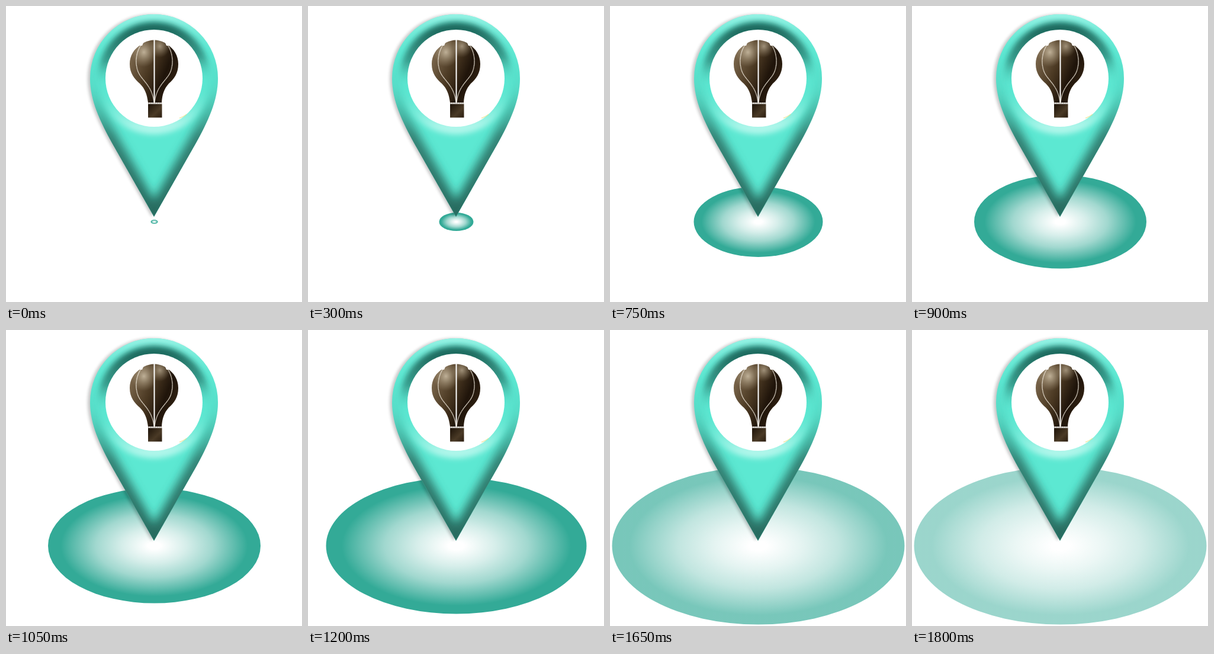
These frames come from a looping animation (500 by 500 pixels, 1950 ms). An HTML page:

```html
<!DOCTYPE html>
<html lang="en">
<head>
<meta charset="utf-8">
<title>Balloon map pin</title>
<style>
  html, body { margin: 0; width: 100%; height: 100%; overflow: hidden; background: #fff; }
  svg { display: block; width: 100%; height: 100%; }
</style>
</head>
<body>
<svg viewBox="0 0 500 500">
  <defs>
    <path id="drop" d="M250 356L180 233C159 195 142 160 142 122A108 108 0 0 1 358 122C358 160 341 195 320 233Z"/>
    <path id="globe" d="M229 65C216 72 209 84 209 98C209 114 217 123 226 131C235 140 238 149 240 163H263C264 149 267 140 275 131C284 123 291 114 291 98C291 84 284 72 272 65L268 62Q250 53 233 62Z"/>
    <clipPath id="inPin"><use href="#drop"/></clipPath>
    <clipPath id="inGlobe"><use href="#globe"/></clipPath>

    <radialGradient id="wave">
      <stop offset=".06" stop-color="#33aa97" stop-opacity="0"/>
      <stop offset=".3" stop-color="#33aa97" stop-opacity=".2"/>
      <stop offset=".55" stop-color="#33aa97" stop-opacity=".46"/>
      <stop offset=".75" stop-color="#33aa97" stop-opacity=".78"/>
      <stop offset=".88" stop-color="#33aa97"/>
    </radialGradient>
    <linearGradient id="rim" gradientUnits="userSpaceOnUse" x1="0" y1="14" x2="0" y2="356">
      <stop offset="0" stop-color="#a4f6ea" stop-opacity=".9"/>
      <stop offset=".2" stop-color="#5ce8d2" stop-opacity=".3"/>
      <stop offset=".36" stop-color="#3fae9d" stop-opacity=".2"/>
      <stop offset=".6" stop-color="#2a6e62" stop-opacity=".85"/>
      <stop offset="1" stop-color="#276a5e"/>
    </linearGradient>
    <linearGradient id="lip" gradientUnits="userSpaceOnUse" x1="245" y1="40" x2="252" y2="204">
      <stop offset="0" stop-color="#1f6a5e"/>
      <stop offset=".3" stop-color="#1f6a5e" stop-opacity=".6"/>
      <stop offset=".58" stop-color="#5ce8d2" stop-opacity="0"/>
      <stop offset="1" stop-color="#b4f7ec" stop-opacity=".95"/>
    </linearGradient>
    <linearGradient id="brown" gradientUnits="userSpaceOnUse" x1="212" y1="85" x2="286" y2="115">
      <stop offset="0" stop-color="#78644a"/>
      <stop offset=".45" stop-color="#4a3822"/>
      <stop offset=".8" stop-color="#1f140a"/>
      <stop offset="1" stop-color="#2c1e10"/>
    </linearGradient>
    <radialGradient id="glow">
      <stop offset="0" stop-color="#c9bba2" stop-opacity=".9"/>
      <stop offset="1" stop-color="#a8987c" stop-opacity="0"/>
    </radialGradient>
    <linearGradient id="basket" x1="0" y1="0" x2="1" y2="1">
      <stop offset="0" stop-color="#1c1208"/>
      <stop offset=".6" stop-color="#4a3a26"/>
      <stop offset="1" stop-color="#2b1d10"/>
    </linearGradient>
    <filter id="soft" x="-20%" y="-20%" width="140%" height="140%"><feGaussianBlur stdDeviation="2.5"/></filter>
    <filter id="bevel" x="-20%" y="-20%" width="140%" height="140%"><feGaussianBlur stdDeviation="8"/></filter>
    <filter id="inner" x="-20%" y="-20%" width="140%" height="140%"><feGaussianBlur stdDeviation="5"/></filter>
  </defs>

  <rect width="500" height="500" fill="#fff"/>
  <ellipse id="ripple" cx="250.5" cy="364.5" fill="url(#wave)"/>

  <use href="#drop" x="-4" opacity=".22" filter="url(#soft)"/>
  <use href="#drop" fill="#5ce8d2"/>
  <g clip-path="url(#inPin)" fill="none">
    <use href="#drop" stroke="url(#rim)" stroke-width="28" filter="url(#bevel)"/>
    <circle cx="250" cy="122" r="82" stroke="url(#lip)" stroke-width="26" filter="url(#inner)"/>
  </g>
  <circle cx="250" cy="122" r="82" fill="#fff"/>
  <path d="M293 189.5Q300 187 305 183" fill="none" stroke="#e8dc70" stroke-opacity=".6" stroke-width="1.5"/>

  <g id="balloon">
    <use href="#globe" fill="url(#brown)"/>
    <g clip-path="url(#inGlobe)" fill="url(#glow)">
      <ellipse cx="233" cy="78" rx="22" ry="25"/>
      <ellipse cx="260" cy="68" rx="17" ry="19" opacity=".75"/>
    </g>
    <g fill="none" stroke="#fff" stroke-width="1.4">
      <path d="M250.500 57V164" stroke-width="2"/>
      <g stroke="#f0e9dc" stroke-dasharray="1.6 .6">
        <path d="M230 63C219 77 217 98 224 113C231 127 247 135 250 163"/>
        <path d="M271 63C282 77 284 98 277 113C270 127 254 135 251 163"/>
      </g>
    </g>
    <path d="M226 67L234 57L230 67ZM275 67L267 57L271 67Z" fill="#fff"/>
    <rect x="240" y="165.5" width="23.5" height="23" fill="url(#basket)"/>
    <path d="M240 164H264" stroke="#4a3a26" stroke-width="1.2" stroke-dasharray="1.5 1.5"/>
  </g>
</svg>
<script>
  const STEP = 150, LOOP = 1950;
  const widths = [6, 14.5, 29, 47.5, 75.5, 109, 145.5, 179.5, 220, 247];
  const heights = [3.5, 7.5, 15.5, 26, 41.5, 59.5, 79, 97, 115, 133];
  const ripple = document.getElementById('ripple');

  // The ripple grows in hard steps, then fades at full size.
  function draw(time) {
    const step = Math.floor((time % LOOP) / STEP);
    const last = widths.length - 1;
    const size = Math.min(step, last);
    ripple.setAttribute('rx', widths[size]);
    ripple.setAttribute('ry', heights[size]);
    ripple.setAttribute('opacity', 1 - 0.17 * Math.max(0, step - last));
  }

  const start = performance.now();
  function tick() {
    draw(performance.now() - start);
    requestAnimationFrame(tick);
  }
  tick();
</script>
</body>
</html>
```
